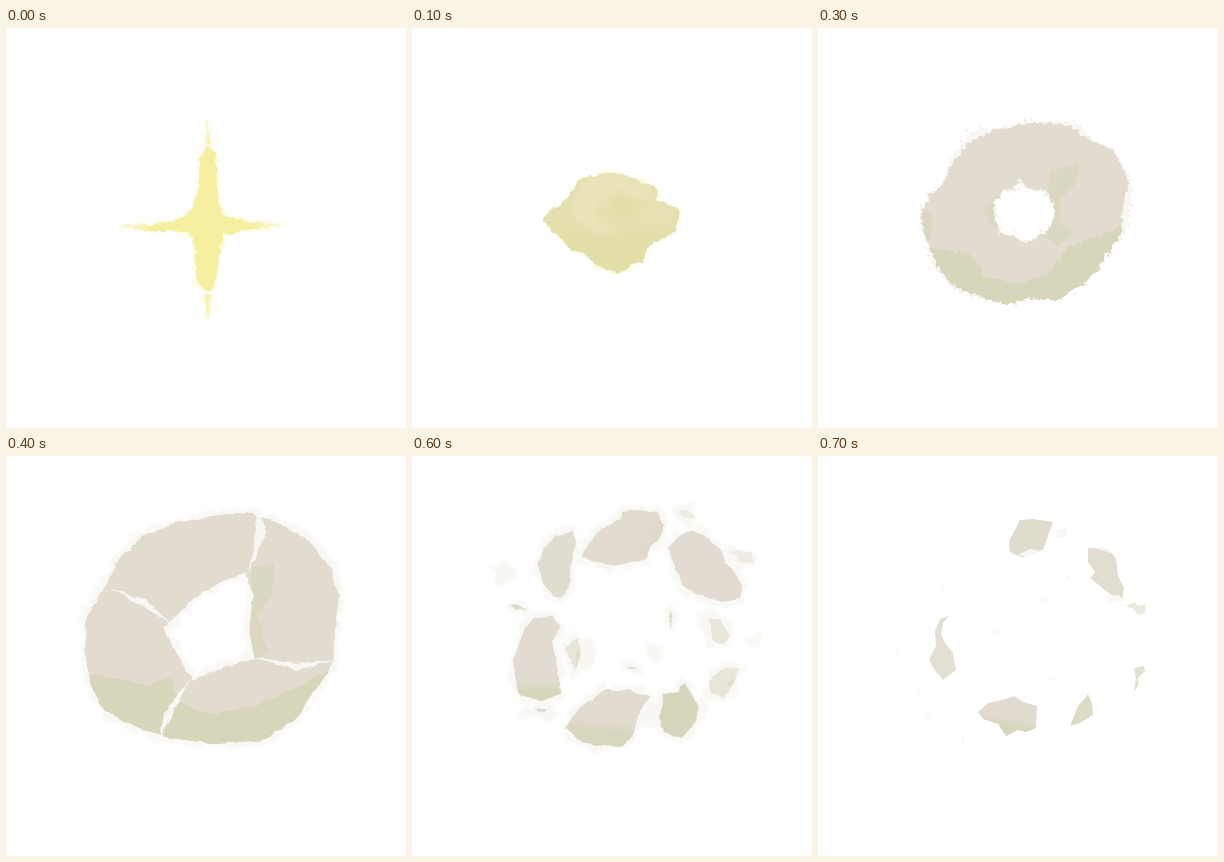
An HTML page that plays this animation: 400x400 px, repeating every 0.8 s.

```html
<!DOCTYPE html>
<html lang="en">
<head>
<meta charset="utf-8">
<title>Sparkle and smoke puff</title>
<style>
  html, body { margin: 0; width: 100%; height: 100%; overflow: hidden; background: #fff; }
  svg { display: block; width: 100vw; height: 100vh; }
  .step {
    visibility: hidden;
    animation: show 800ms step-end infinite;
    animation-delay: calc(var(--i) * 100ms - 800ms);
  }
  @keyframes show {
    0% { visibility: visible; }
    12.5%, 100% { visibility: hidden; }
  }
  .beige { fill: #e1dbd0; }
  .green { fill: #d7d6ba; }
  .pale { fill: #efece3; }
  .faint { fill: #f8f7f3; }
</style>
</head>
<body>
<svg viewBox="0 0 400 400">
  <defs>
    <!-- dry-brush edge with a speckled fringe -->
    <filter id="rough" filterUnits="userSpaceOnUse" x="0" y="0" width="400" height="400" color-interpolation-filters="sRGB">
      <feTurbulence type="fractalNoise" baseFrequency=".2" numOctaves="3" seed="4" result="noise"/>
      <feDisplacementMap in="SourceAlpha" in2="noise" scale="20" xChannelSelector="G" yChannelSelector="R" result="loose"/>
      <feGaussianBlur in="loose" stdDeviation=".7" result="soft"/>
      <feFlood flood-color="#efede2" flood-opacity=".75"/>
      <feComposite in2="soft" operator="in" result="fringe"/>
      <feDisplacementMap in="SourceGraphic" in2="noise" scale="7" xChannelSelector="R" yChannelSelector="G" result="body"/>
      <feGaussianBlur in="body" stdDeviation=".4" result="edge"/>
      <feMerge><feMergeNode in="fringe"/><feMergeNode in="edge"/></feMerge>
    </filter>
    <!-- calmer edge inside a wide, almost white wash -->
    <filter id="wash" filterUnits="userSpaceOnUse" x="0" y="0" width="400" height="400" color-interpolation-filters="sRGB">
      <feTurbulence type="fractalNoise" baseFrequency=".09" numOctaves="2" seed="4" result="noise"/>
      <feMorphology in="SourceAlpha" operator="dilate" radius="4" result="wide"/>
      <feDisplacementMap in="wide" in2="noise" scale="16" xChannelSelector="G" yChannelSelector="R" result="loose"/>
      <feGaussianBlur in="loose" stdDeviation="1.6" result="soft"/>
      <feFlood flood-color="#f7f5f0" flood-opacity=".75"/>
      <feComposite in2="soft" operator="in" result="fringe"/>
      <feDisplacementMap in="SourceGraphic" in2="noise" scale="5" xChannelSelector="R" yChannelSelector="G" result="body"/>
      <feGaussianBlur in="body" stdDeviation=".7" result="edge"/>
      <feMerge><feMergeNode in="fringe"/><feMergeNode in="edge"/></feMerge>
    </filter>
    <filter id="glow" filterUnits="userSpaceOnUse" x="0" y="0" width="400" height="400" color-interpolation-filters="sRGB">
      <feTurbulence type="fractalNoise" baseFrequency=".14" numOctaves="3" seed="7" result="noise"/>
      <feMorphology in="SourceAlpha" operator="dilate" radius="1" result="wide"/>
      <feDisplacementMap in="wide" in2="noise" scale="14" xChannelSelector="G" yChannelSelector="R" result="loose"/>
      <feGaussianBlur in="loose" stdDeviation="1" result="soft"/>
      <feFlood flood-color="#faf7cf" flood-opacity=".7"/>
      <feComposite in2="soft" operator="in" result="fringe"/>
      <feDisplacementMap in="SourceGraphic" in2="noise" scale="6" xChannelSelector="R" yChannelSelector="G" result="body"/>
      <feGaussianBlur in="body" stdDeviation=".6" result="edge"/>
      <feMerge><feMergeNode in="fringe"/><feMergeNode in="edge"/></feMerge>
    </filter>
    <filter id="blend"><feGaussianBlur stdDeviation="3"/></filter>
    <linearGradient id="low" x1=".2" x2="0" y2="1">
      <stop offset=".48" stop-color="#e1dbd0"/><stop offset=".66" stop-color="#d8d6bd"/>
    </linearGradient>
    <linearGradient id="foot" x2="0" y2="1">
      <stop offset=".76" stop-color="#e1dbd1"/><stop offset=".88" stop-color="#d7d6bb"/>
    </linearGradient>
    <linearGradient id="side" x2="1" y2="0">
      <stop offset=".15" stop-color="#d9d7c1"/><stop offset=".38" stop-color="#e1dbd0"/>
    </linearGradient>
    <linearGradient id="rim" x2="1" y2=".3">
      <stop offset=".05" stop-color="#dddaca"/><stop offset=".3" stop-color="#e1dbd0"/><stop offset=".8" stop-color="#e1dbd0"/><stop offset="1" stop-color="#dcd9c8"/>
    </linearGradient>
    <clipPath id="cloud">
      <path d="M107 188 122 175 130 172 138 162 148 150 155 137 165 133 178 131 192 126 204 126 218 132 232 137 246 142 258 147 262 157 258 164 272 170 287 173 291 182 289 196 284 206 270 216 256 220 249 227 244 234 242 246 228 250 216 260 206 262 195 257 180 254 173 244 160 236 146 231 132 218 122 208 113 199Z"/>
    </clipPath>
    <clipPath id="ring">
      <path clip-rule="evenodd" d="M103 187 110 170 125 155 135 135 150 115 175 102 190 100 210 95 235 95 255 100 275 113 295 122 305 140 311 155 305 180 303 205 290 225 278 243 262 258 240 272 210 270 190 277 160 268 135 258 120 240 110 215 106 203Z
        M175 180 182 165 196 160 203 151 209 160 228 162 235 175 236 190 230 203 218 210 207 215 195 208 182 206 178 195Z"/>
    </clipPath>
    <clipPath id="wide">
      <path clip-rule="evenodd" d="M80 160 98 132 113 103 137 80 165 68 205 60 240 56 272 67 302 84 325 112 333 140 329 175 326 208 307 238 288 264 258 284 210 288 165 282 130 271 100 256 86 233 79 200Z
        M158 172 188 142 215 126 240 116 247 140 243 175 249 203 218 211 188 225 173 203Z"/>
    </clipPath>
    <g id="tones">
      <path fill="#d0d0b0" d="M90 110H310V280H90Z"/>
      <g filter="url(#blend)">
        <path fill="#d5d3bc" d="M108 190 128 168 200 120 290 160 292 196 262 210 225 208 196 216 160 208 125 200Z"/>
        <path fill="#ded8cd" d="M150 156 160 134 192 126 232 135 258 150 246 164 224 160 210 150 196 156 182 172 178 188 200 206 190 212 164 200 146 184 150 172Z"/>
        <path fill="#d9d5c6" d="M244 170 268 166 284 176 278 190 260 194 244 188Z"/>
        <path fill="#d0d0b1" d="M200 162 226 160 240 172 226 186 204 182Z"/>
      </g>
    </g>
  </defs>

  <g class="step" style="--i:0" filter="url(#glow)">
    <path fill="#f5f09f" d="M200 119 204 119 210 127 211 160 214 184 222 189 245 194 262 197 245 202 218 207 213 225 211 250 206 262 198 262 191 252 189 225 187 210 180 203 140 203 128 199 150 196 178 190 188 180 193 160 195 127Z"/>
    <path fill="#f8f4b8" d="M201 89 204 115 200 115Z M199 266H205L204 280 201 292Z M113 198 140 196V202Z M250 194 276 197 252 201Z"/>
  </g>

  <g class="step" style="--i:1" filter="url(#glow)">
    <g transform="translate(200 195) scale(.74) translate(-200 -195)">
      <g clip-path="url(#cloud)">
        <use href="#tones"/>
        <path fill="#f5f09f" opacity=".45" d="M90 110H310V280H90Z"/>
      </g>
    </g>
  </g>

  <g class="step" style="--i:2" filter="url(#rough)">
    <path class="faint" d="M226 132 248 136 268 162 256 158Z M253 228 272 218 272 233 260 234Z M107 188 122 176 118 204Z M128 218 168 240 172 252 152 242Z M205 258 240 248 218 264Z"/>
    <g clip-path="url(#cloud)"><use href="#tones"/></g>
  </g>

  <g class="step" style="--i:3" filter="url(#rough)">
    <path class="faint" d="M128 148 136 126 152 106 170 100 140 138Z M232 93 262 98 272 112Z M306 150 314 160 307 206 300 210Z M106 206 116 240 130 254 118 225Z"/>
    <g clip-path="url(#ring)">
      <path class="beige" d="M80 80H330V290H80Z"/>
      <path class="green" d="M100 218 125 222 150 225 163 238 165 248 200 256 232 246 248 220 270 212 310 196 300 290H110Z"/>
      <path fill="#dad7c2" d="M232 142 262 134 257 156 242 172 243 194 256 206 240 218 226 208Z M100 180 116 186 112 212 102 214Z M164 182 182 164 186 200 176 200Z"/>
    </g>
  </g>

  <g class="step" style="--i:4" filter="url(#wash)">
    <g clip-path="url(#wide)">
      <path class="beige" d="M60 40H350V310H60Z"/>
      <path class="green" d="M76 218 110 222 138 230 165 222 172 246 205 258 250 250 290 232 335 205 320 300H80Z"/>
      <path fill="#dad7c2" d="M246 112 268 108 266 140 252 160 262 196 244 206Z"/>
      <path class="faint" d="M252 54 260 76 242 118 248 88Z M104 132 140 144 166 168 136 150Z M154 282 158 258 184 222 168 256Z M244 200 290 208 332 204 290 214Z"/>
    </g>
  </g>

  <g class="step" style="--i:5" filter="url(#wash)">
    <path fill="url(#rim)" d="M112 110 121 94 130 84 138 76 150 74 165 67 180 63 200 61 212 55 235 54 250 57 254 68 245 82 242 97 222 104 210 114 195 124 184 135 168 141 152 145 142 139 130 135 120 132 116 120Z"/>
    <path fill="url(#side)" d="M262 82 274 74 286 80 298 84 312 100 325 118 332 141 327 160 329 176 320 192 304 201 276 202 258 193 250 175 250 164 256 153 250 140 253 120 257 100Z"/>
    <path fill="url(#low)" d="M79 155 102 148 120 148 130 152 134 159 150 162 162 171 170 184 175 206 172 220 166 233 150 256 148 264 130 272 112 273 100 262 91 242 92 223 80 207 76 182Z"/>
    <path fill="url(#low)" d="M155 272 160 258 175 250 190 238 205 228 215 213 235 213 255 219 275 222 287 235 288 252 280 270 258 288 235 284 222 277 210 290 185 288 165 285Z"/>
    <path fill="#dbd9c5" d="M297 222 310 213 328 211 326 225 315 238 305 244 297 232Z"/>
    <path class="pale" d="M86 122 92 111 99 114 96 126Z M266 55 274 53 284 66 272 64Z M318 93 340 98 342 108 330 108Z"/>
    <path fill="#e6e3d6" d="M235 199 242 195 248 198 240 203Z"/>
    <path class="faint" d="M338 182 345 182 343 187Z M174 182 186 190 180 206Z M190 208 204 202 196 220Z"/>
  </g>

  <g class="step" style="--i:6" filter="url(#wash)">
    <path class="faint" d="M84 114 94 110 98 120 88 126Z M166 196 178 186 182 206 168 212Z M228 258 242 248 240 268Z M112 254 140 252 136 262Z M290 158 300 158 298 190Z M236 196 246 194 244 202Z M338 183 344 182 342 187Z"/>
    <path fill="#e0dcd0" d="M126 110 132 92 145 79 161 76 163 88 158 110 160 126 150 141 140 139 131 126Z"/>
    <path fill="url(#rim)" d="M169 101 178 86 190 72 208 64 210 56 225 54 245 56 253 70 248 82 240 90 235 103 220 105 205 110 185 107Z"/>
    <path fill="#e1dbd1" d="M256 92 268 79 280 74 295 82 308 94 317 110 331 128 328 143 310 146 290 140 272 131 265 115Z"/>
    <path fill="url(#foot)" d="M106 190 112 175 121 162 141 161 148 172 140 185 144 205 147 222 148 238 130 245 108 239 103 220 102 203Z"/>
    <path fill="url(#low)" d="M154 272 163 256 178 245 192 234 215 234 238 240 226 258 222 277 210 291 190 290 170 286Z"/>
    <path fill="#d7d6bd" d="M247 262 252 238 265 236 273 226 280 240 288 252 282 268 270 282 252 276Z"/>
    <path fill="#e8e6da" d="M298 238 297 225 308 213 327 211 322 228 312 242Z M298 162 308 164 318 180 310 188 300 184Z M154 194 160 184 167 182 168 200 163 216 158 204Z"/>
    <path fill="#deddcb" d="M314 228 322 222 318 234Z M96 150 104 149 114 153 104 155Z M214 210 226 212 220 214Z M122 253 138 253 132 256Z M257 154 261 160 258 174Z M164 192 168 200 164 214Z"/>
    <path class="pale" d="M266 55 274 53 284 64 272 63Z M318 94 340 98 341 107 328 106Z"/>
  </g>

  <g class="step" style="--i:7">
    <g fill="#fbfaf7">
      <path d="M218 144 230 141 227 148Z M170 175 182 172 179 179Z M140 284 147 277 146 290Z M296 280 306 276 302 279Z M105 260 114 253 112 262Z M121 131 129 128 126 134Z M232 222 238 220 236 226Z M246 122 254 120 250 125Z M78 194 82 202 77 200Z M98 232 104 234 100 237Z M236 285 241 288 238 291Z"/>
    </g>
    <path fill="#dfdbcd" d="M191 85 198 72 202 64 215 63 235 66 230 80 225 94 212 97 205 102 192 96Z"/>
    <path fill="#e1ddd0" d="M270 92 290 93 298 102 300 120 306 132 304 144 292 138 282 130 272 122 277 116 270 106Z"/>
    <path fill="#e3dfd3" d="M122 163 131 160 125 167 123 178 127 187 135 197 138 214 125 224 115 212 111 203 118 190 117 175Z"/>
    <path fill="url(#low)" d="M160 256 170 247 188 243 196 240 205 246 219 250 218 272 208 276 200 274 188 280 180 268 165 263Z"/>
    <path fill="#dcdbc6" d="M252 270 260 250 268 241 270 238 274 247 275 259 262 267Z"/>
    <path fill="#e3e1d3" d="M316 212 326 210 327 215 320 222 321 228 316 236 318 222Z"/>
    <path fill="#ebe8df" d="M308 150 316 146 320 150 328 148 327 157 320 159 316 153Z"/>
    <path class="faint" d="M200 99 212 93 224 95 208 101Z M288 140 300 139 307 144 292 147Z M238 74 248 72 248 82 239 81Z M272 91 290 92 294 97Z"/>
  </g>
</svg>
</body>
</html>
```
